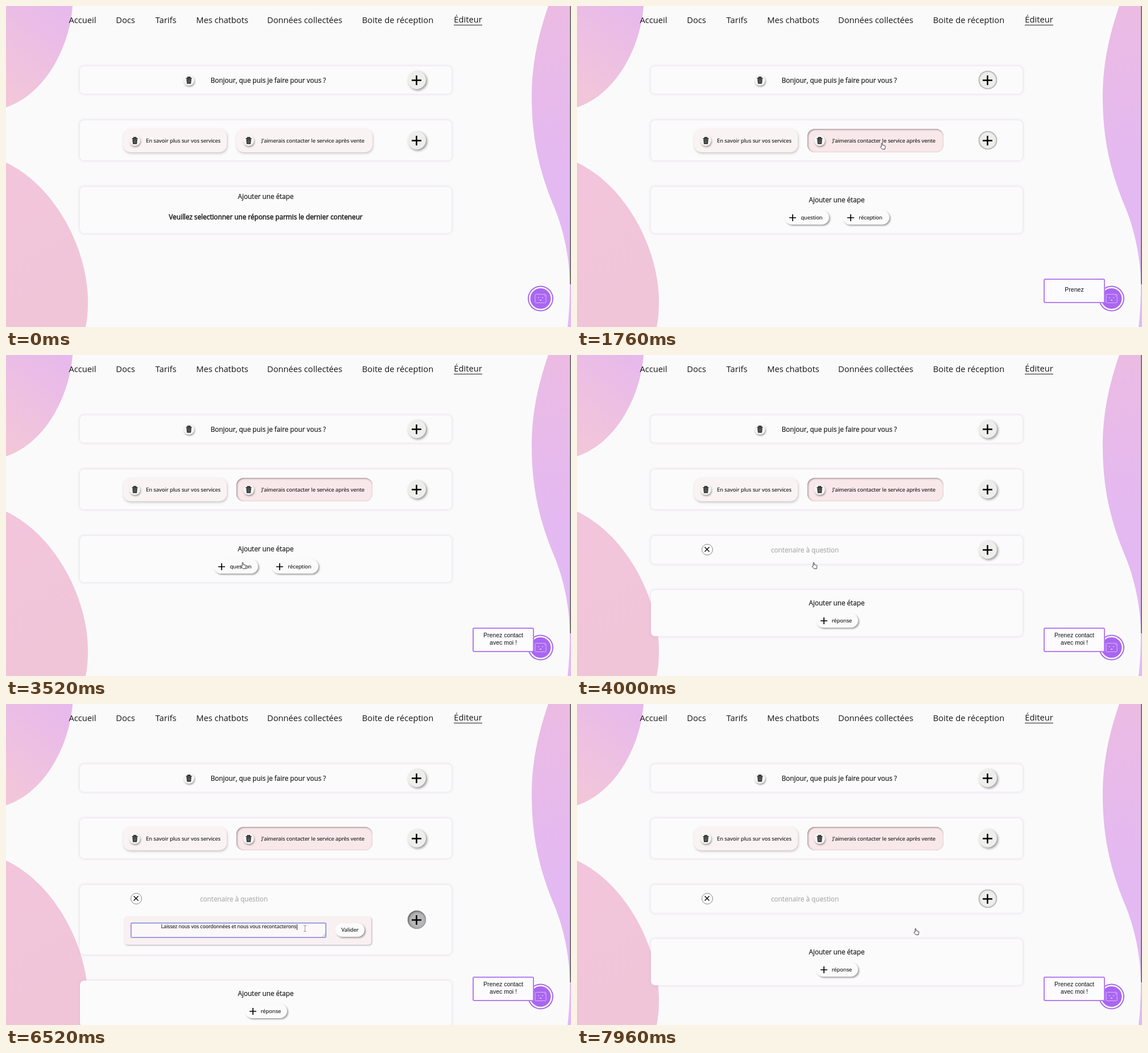
These frames come from a looping animation (993 px wide and 564 px high, 8000 ms). An HTML page:

```html
<!DOCTYPE html>
<html lang="fr">
<head>
<meta charset="utf-8">
<title>Éditeur</title>
<style>
html, body { margin: 0; width: 100%; height: 100%; overflow: hidden; background: #fbfafb; }
#stage { position: relative; width: 993px; height: 564px; overflow: hidden; color: #161616;
  font-family: "Open Sans", "Noto Sans", sans-serif; }
#stage div, #stage svg { position: absolute; box-sizing: border-box; }
.text { white-space: nowrap; line-height: 1.3; transform: translate(-50%, -50%); }
.nav { font-size: 14.7px; }
.body { font-size: 11.7px; -webkit-text-stroke: .2px; }
.small { font-size: 9.35px; -webkit-text-stroke: .15px; }
.bold { font-size: 11.75px; -webkit-text-stroke: .45px; }
.muted { font-size: 11.75px; color: #a9a8aa; -webkit-text-stroke: .15px; }
.typed { font-size: 8.65px; -webkit-text-stroke: .15px; }
.line { background: #222; }
.scrollbar { background: #777; }

.card { background: #fcfbfc; border-radius: 7px; box-shadow: 0 0 5px 1px rgba(190, 170, 205, .32); }
.reply { background: #faf3f4; border-radius: 13px; box-shadow: 1px 2px 4px rgba(120, 100, 110, .38); }
.pill { background: #fcfbfb; border-radius: 13px; box-shadow: 2px 2px 3px rgba(0, 0, 0, .36); }
.plus { border-radius: 50%; background: #eeeeec; }
.trash { border-radius: 50%; background: #f7f5f5; box-shadow: 1px 2px 3px rgba(0, 0, 0, .36); }
.cross { border-radius: 50%; background: #fdfdfd; border: 1.5px solid #858585; }
.panel { background: #f9f0f2; border-radius: 5px; box-shadow: 1px 1px 3px rgba(90, 70, 90, .45); }
.field { background: #fcf8fa; border: 1px solid #aaa; border-radius: 2px; }
.bubble { background: #fcfbfd; border: 2px solid #b67df1; border-radius: 3px; color: #111;
  font: 10.5px/12.4px "Liberation Sans", Arial, sans-serif; text-align: center; padding: 0 14px 4px;
  display: flex; align-items: center; justify-content: center; }

/* Percentages of the 8 s loop: 1% = 80 ms. */
.a { animation: 8s linear infinite; }
.step { animation-timing-function: step-end; }
.hint { animation-name: hint; }
.choices { animation-name: choices; }
.question { animation-name: question; }
.open { animation-name: open; }
.pasted { animation-name: pasted; }
.help { animation-name: help; }
.press { animation-name: press; }
.release { animation-name: release; }
.toggle { animation-name: shift, dark; }
.grow { animation-name: grow; }
.lower { animation-name: lower; }
.focus { animation-name: focus; }
.caret { animation-name: caret; background: #222; }
.pointer { animation-name: pointer; animation-timing-function: ease-in-out; }
.arrow { animation-name: arrow; }
.hand { animation-name: hand; }
.beam { animation-name: beam; }

@keyframes hint { 0% { visibility: visible } 17.5%, to { visibility: hidden } }
@keyframes choices { 0% { visibility: hidden } 17.5% { visibility: visible } 45.5%, to { visibility: hidden } }
@keyframes question { 0% { visibility: hidden } 45.5%, to { visibility: visible } }
@keyframes open { 0% { visibility: hidden } 66.5% { visibility: visible } 96%, to { visibility: hidden } }
@keyframes pasted { 0% { visibility: hidden } 79% { visibility: visible } 96%, to { visibility: hidden } }
@keyframes help { 0% { visibility: hidden } 17.5%, to { visibility: visible } }
@keyframes press {
  0%, 9.5% { background: #faf3f4; box-shadow: 1px 2px 4px rgba(120, 100, 110, .38), inset 0 0 0 transparent }
  11.5%, 17% { background: #f9e9e8; box-shadow: 1px 2px 4px rgba(120, 100, 110, .38), inset 0 0 0 transparent }
  18.5%, to { background: #f9e8e9; box-shadow: 0 0 1px rgba(120, 100, 110, .4), inset 1px 1px 3px rgba(70, 50, 60, .6) }
}
@keyframes release {
  0%, 17.4% { box-shadow: 2px 2px 4px rgba(0, 0, 0, .42), inset 0 0 0 transparent }
  17.5%, 22% { box-shadow: 0 0 1px rgba(0, 0, 0, .5), inset 0 0 3px #555 }
  24.5%, to { box-shadow: 2px 2px 4px rgba(0, 0, 0, .42), inset 0 0 0 transparent }
}
@keyframes dark {
  0%, 64% { background: #eeeeec; box-shadow: 2px 2px 4px rgba(0, 0, 0, .42), inset 0 0 0 transparent }
  66%, 96% { background: #b7b6b9; box-shadow: 0 0 1px rgba(0, 0, 0, .5), inset 1px 1px 4px #444 }
  99%, to { background: #eeeeec; box-shadow: 0 0 1px rgba(0, 0, 0, .5), inset 0 0 3px #555 }
}
@keyframes grow { 0%, 65% { height: 49px } 67%, 96% { height: 122px } 96.5%, to { height: 49px } }
@keyframes shift { 0%, 65% { top: 326px } 67%, 96% { top: 363px } 96.5%, to { top: 326px } }
@keyframes lower {
  0%, 45.49% { top: 318px } 45.5%, 65% { top: 413px } 67%, 96% { top: 486px } 96.5%, to { top: 413px }
}
@keyframes focus {
  0% { border-color: #aaa; box-shadow: none }
  74.5%, to { border-color: #8288cf; box-shadow: inset 0 0 0 1px #b4baf0 }
}
@keyframes caret { 0% { visibility: hidden } 79% { visibility: visible } 87.5%, to { visibility: hidden } }
@keyframes pointer {
  0%, 3% { transform: translate(585px, 420px) }
  10%, 23% { transform: translate(537px, 246px) }
  34%, 36.5% { transform: translate(424px, 362px) }
  41%, 54% { transform: translate(417px, 370px) }
  62%, 65.5% { transform: translate(722px, 351px) }
  72%, 84.5% { transform: translate(525px, 394px) }
  91%, to { transform: translate(596px, 400px) }
}
@keyframes arrow {
  0% { visibility: hidden } 3% { visibility: visible } 9% { visibility: hidden }
  24.5% { visibility: visible } 33% { visibility: hidden }
  55.5% { visibility: visible } 61% { visibility: hidden }
  67% { visibility: visible } 70.5%, to { visibility: hidden }
}
@keyframes hand {
  0% { visibility: hidden } 9% { visibility: visible } 24.5% { visibility: hidden }
  33% { visibility: visible } 55.5% { visibility: hidden }
  61% { visibility: visible } 67% { visibility: hidden } 88%, to { visibility: visible }
}
@keyframes beam { 0% { visibility: hidden } 70.5% { visibility: visible } 88%, to { visibility: hidden } }
</style>
</head>
<body>
<div id="stage"></div>
<script>
const LOOP = 8000, TYPE_START = 1450, TYPE_STEP = 48;
const MESSAGE = "Prenez contact avec moi !";

const box = (cls, x, y, w, h, inner = "") =>
  `<div class="${cls}" style="left:${x}px;top:${y}px;width:${w}px;height:${h}px">${inner}</div>`;
const text = (cls, x, y, label) =>
  `<div class="text ${cls}" style="left:${x}px;top:${y}px">${label}</div>`;
const group = (cls, inner) => `<div class="${cls}" style="left:0;top:0">${inner}</div>`;
const icon = (x, y, w, h, inner) =>
  `<svg style="left:${x}px;top:${y}px" width="${w}" height="${h}" fill="none">${inner}</svg>`;

const sign = (x, y, r, weight) => icon(x - r, y - r, 2 * r, 2 * r,
  `<path d="M${r} 0V${2 * r}M0 ${r}H${2 * r}" stroke="#000" stroke-width="${weight}"/>`);
const plus = (cls, x, y) => box("plus " + cls, x - 16, y - 16, 32, 32, sign(16, 16, 8.5, 2.5));
const trash = (x, y) => box("trash", x - 10, y - 9.5, 19, 19, icon(4, 3, 11, 13,
  `<path d="M.5 3H10.5M3.5 2.5V1H7.5V2.5" stroke="#111" stroke-width="1.4"/>
   <path d="M1.3 4.2H9.7L9 12.5H2Z" fill="#222"/>
   <path d="M3.7 5.5V11M5.5 5.5V11M7.3 5.5V11" stroke="#aaa" stroke-width=".7"/>`));
const pill = (x, y, w, label, labelX) =>
  box("pill", x, y, w, 25, sign(13.5, 12.5, 6, 1.7) + text("small", labelX - x, 12.5, label));

const backdrop = icon(0, 0, 993, 564, `
  <defs>
    <linearGradient id="topLeft" x1=".8" y1="0" x2=".3" y2="1">
      <stop stop-color="#e7b9ec"/><stop offset="1" stop-color="#f2c6d9"/></linearGradient>
    <linearGradient id="bottomLeft" x1="0" y1="0" x2=".3" y2="1">
      <stop stop-color="#f2c5dc"/><stop offset="1" stop-color="#f1c5d8"/></linearGradient>
    <linearGradient id="right" x1="0" y1="0" x2="0" y2="1">
      <stop stop-color="#ebbbe3"/><stop offset=".5" stop-color="#e4b9f1"/><stop offset="1" stop-color="#e2b9f6"/></linearGradient>
  </defs>
  <path fill="url(#topLeft)" d="M0 0H117C112 70 70 155 0 178Z"/>
  <path fill="url(#bottomLeft)" d="M0 275C85 315 144 425 144 520Q144 545 140 564H0Z"/>
  <path fill="url(#right)" d="M953 0C934 55 924 105 924 160C924 235 938 290 960 345C978 385 991 440 991 490Q991 530 987 564H993V0Z"/>`);

const nav = [["Accueil", 134.5], ["Docs", 210], ["Tarifs", 281], ["Mes chatbots", 380],
  ["Données collectées", 525], ["Boite de réception", 688.5], ["Éditeur", 812]]
  .map(([label, x]) => text("nav", x, label === "Éditeur" ? 23.5 : 24.5, label)).join("");

const greeting = box("card", 130, 106, 653, 48) + trash(322, 130.5) +
  text("body", 461, 130.5, "Bonjour, que puis je faire pour vous ?") + plus("a release", 721.5, 130);

const replies = box("card", 130, 201, 653, 70) +
  box("reply", 206, 216, 182, 41) + trash(227, 236.5) +
  text("small", 311.5, 236.5, "En savoir plus sur vos services") +
  box("reply a press", 405, 216, 239, 41) + trash(426.5, 236.5) +
  text("small", 539.5, 236.5, "J'aimerais contacter le service après vente") +
  plus("a release", 721.5, 236);

const form = box("panel", 208, 374, 434, 49) +
  box("field a step focus", 219, 384, 344, 27,
    icon(335, 17, 7, 7, `<path d="M1 7L7 1M4 7L7 4" stroke="#888" stroke-width=".7"/>`)) +
  box("pill", 579, 385, 51, 24, text("small", 25.5, 12, "Valider"));

const question = box("card a grow", 130, 318, 653, 49) +
  box("cross", 219, 332, 20, 20,
    icon(4, 4, 9, 9, `<path d="M.5 .5L8.5 8.5M8.5 .5L.5 8.5" stroke="#111" stroke-width="1.5"/>`)) +
  text("muted", 400.5, 342.5, "contenaire à question") +
  plus("a toggle", 721.5, 342) +
  group("a step open", form) +
  group("a step pasted",
    text("typed", 391.5, 392, "Laissez nous vos coordonnées et nous vous recontacterons")) +
  box("a step caret", 511, 387, 1, 10);

const nextStep = box("card a lower", 130, 318, 653, 81,
  group("a step hint", text("body", 326.5, 16.5, "Ajouter une étape") +
    text("bold", 326.5, 53, "Veuillez selectionner une réponse parmis le dernier conteneur")) +
  group("a step help", text("body", 326.5, 23, "Ajouter une étape")) +
  group("a step choices", pill(235, 41, 78, "question", 282.5) + pill(337, 41, 82, "réception", 386)) +
  group("a step question", pill(290, 41, 74, "réponse", 335.5)));

const launcher = icon(914, 489, 50, 50, `
  <circle cx="25.5" cy="25" r="22.5" fill="#a36be6"/>
  <circle cx="25.5" cy="25" r="20.5" fill="#fdfbff"/>
  <circle cx="25.5" cy="25" r="18" fill="#aa66f1"/>
  <rect x="16" y="17.5" width="19" height="15" rx="1.5" stroke="#d9b8fa"/>
  <path d="M21 23.5h2M28 23.5h2M24 27.5q1.5 1.3 3 0M32 20h1.5" stroke="#f0e2ff" stroke-width="1.2"/>`);

const pointer = group("a pointer",
  group("a step arrow", icon(-4, -6, 12, 16,
    `<path d="M1 1V12L3.7 9.6L5.5 13.6L7.2 12.8L5.4 9H9Z" fill="#111" stroke="#fff" stroke-width=".8"/>`)) +
  group("a step hand", icon(-5, -7, 12, 14,
    `<path d="M3.2 8V2Q4 .8 4.9 2V5.4L9 6.3Q10 6.6 9.9 8L9.2 12.5H4.5L1.2 8.6Q1.4 7 3.2 8Z"
      fill="#fff" stroke="#333" stroke-width=".9"/>`)) +
  group("a step beam", icon(-3, -5, 7, 11,
    `<path d="M1 .5H6M3.5 .5V10.5M1 10.5H6" stroke="#999"/>`)));

document.getElementById("stage").innerHTML = backdrop + nav + box("line", 787, 33, 50, 1) +
  greeting + replies + group("a step question", question) + nextStep +
  box("scrollbar", 991, 0, 2, 489) + launcher +
  group("a step help", box("bubble", 820, 479, 108, 43, `<span id="message"></span>`)) + pointer;

const message = document.getElementById("message");
const start = performance.now();
function tick() {
  const t = (performance.now() - start) % LOOP;
  const count = Math.max(0, Math.floor((t - TYPE_START) / TYPE_STEP));
  const shown = MESSAGE.slice(0, count);
  if (message.textContent !== shown) message.textContent = shown;
  requestAnimationFrame(tick);
}
tick();
</script>
</body>
</html>
```
